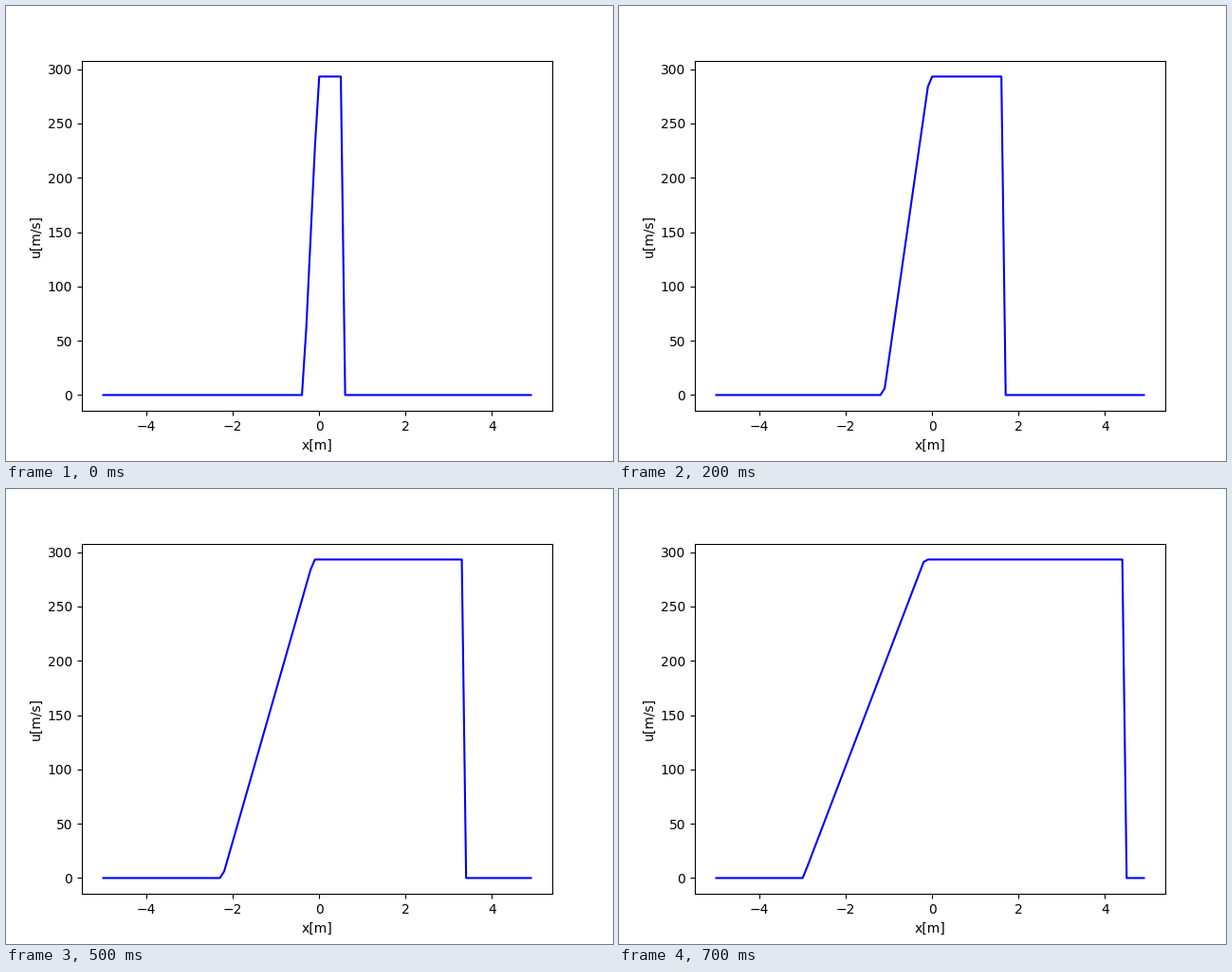
A matplotlib script for the animation above (0.8 s loop, 640 by 480 pixels).

```python
"""Gas velocity in a shock tube: exact Riemann solution over time."""
import math

import numpy as np
import matplotlib.pyplot as plt
from matplotlib.animation import FuncAnimation

GAMMA = 1.4
P_LEFT, RHO_LEFT = 1e5, 1.0
P_RIGHT, RHO_RIGHT = 1e4, 0.125
STEPS = 8
TIME_STEP = 1e-3  # simulated seconds per frame


def sound_speed(p, rho):
    return math.sqrt(GAMMA * p / rho)


A_LEFT = sound_speed(P_LEFT, RHO_LEFT)
A_RIGHT = sound_speed(P_RIGHT, RHO_RIGHT)


def rarefaction_velocity(p):
    ratio = (p / P_LEFT) ** ((GAMMA - 1) / (2 * GAMMA))
    return 2 * A_LEFT / (GAMMA - 1) * (1 - ratio)


def shock_velocity(p):
    a = 2 / ((GAMMA + 1) * RHO_RIGHT)
    b = (GAMMA - 1) / (GAMMA + 1) * P_RIGHT
    return (p - P_RIGHT) * math.sqrt(a / (p + b))


def star_pressure():
    """Bisect for the pressure at which both waves give the same velocity."""
    low, high = P_RIGHT, P_LEFT
    for _ in range(60):
        mid = (low + high) / 2
        if rarefaction_velocity(mid) > shock_velocity(mid):
            low = mid
        else:
            high = mid
    return mid


P_STAR = star_pressure()
U_STAR = rarefaction_velocity(P_STAR)
SHOCK_SPEED = A_RIGHT * math.sqrt(
    ((GAMMA + 1) * P_STAR / P_RIGHT + GAMMA - 1) / (2 * GAMMA))


def velocity(x, t):
    fan = 2 / (GAMMA + 1) * (A_LEFT + x / t)
    return np.where(x < SHOCK_SPEED * t, np.clip(fan, 0, U_STAR), 0)


plt.rcParams["font.family"] = "DejaVu Sans"
fig, ax = plt.subplots(figsize=(6.4, 4.8), dpi=100)
x = np.arange(-5, 5, 0.1)
line, = ax.plot(x, velocity(x, TIME_STEP), color="blue")
ax.set_xlabel("x[m]")
ax.set_ylabel("u[m/s]")


def update(step):
    line.set_ydata(velocity(x, (step + 1) * TIME_STEP))
    return line,


anim = FuncAnimation(fig, update, frames=STEPS, interval=100, repeat=True)
plt.show()
```
